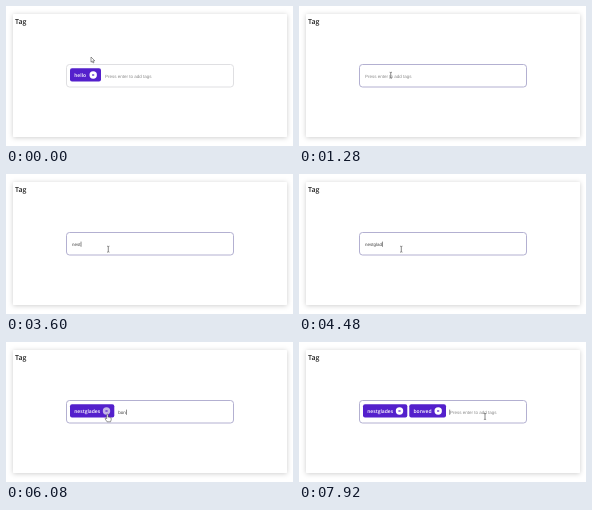
These frames come from a looping animation (287x140 px, 8000 ms). An HTML page:

```html
<!DOCTYPE html>
<html lang="en">
<head>
<meta charset="utf-8">
<title>Tag input</title>
<style>
  html, body { margin: 0; width: 100%; height: 100%; overflow: hidden; background: #fff; }
  svg { display: block; width: 100%; height: 100%; }
  text { text-rendering: geometricPrecision; }
  .title { font: 600 7px "Open Sans", sans-serif; fill: #222; }
  .tag rect { fill: #5420cc; }
  .tag text { font: 600 5px "Open Sans", sans-serif; fill: #fff; }
  .tag circle { fill: #fff; }
  .tag path { stroke: #5420cc; stroke-width: .7; }
  .tag.hover circle { fill: #c3b4e6; }
  #entry { font: 4.5px "Liberation Sans", Arial, sans-serif; }
  #caret { fill: #444; }
  .pointer { fill: #fff; stroke: #444; stroke-width: .55; stroke-linejoin: round; }
  #beam { fill: none; stroke: #555; stroke-width: .7; }
</style>
</head>
<body>
<svg viewBox="0 0 287 140">
  <defs>
    <filter id="shadow" x="-10%" y="-15%" width="120%" height="130%">
      <feDropShadow dx="0" dy=".7" stdDeviation="2.4" flood-color="#000" flood-opacity=".2"/>
    </filter>
  </defs>
  <rect x="7" y="8" width="274" height="123" rx="1" fill="#fff" filter="url(#shadow)"/>
  <text class="title" x="9" y="17.7">Tag</text>
  <rect id="field" x="60.5" y="58.5" width="167" height="22.5" rx="3" fill="#fff" stroke-width=".9"/>
  <g id="tags"></g>
  <text id="entry" y="71.7"></text>
  <rect id="caret" y="67.6" width=".6" height="5.2"/>
  <g id="mouse">
    <path id="arrow" class="pointer" d="M0 0V5.2L1.2 4.1 2 6 2.9 5.6 2.1 3.8H3.8Z"/>
    <path id="hand" class="pointer" d="M-.7 .5Q0-.5.7.5V3Q1.4 2.5 1.8 3.2 2.5 2.8 2.9 3.5 3.8 3.2 3.8 4.2V5.6L3.1 7.6H-.3L-2.3 4.7Q-2.2 3.7-1.3 4.2L-.7 4.8Z"/>
    <path id="beam" d="M-1.1-3Q0-3 0-2.4 0-3 1.1-3M0-2.4V2.4M-1.1 3Q0 3 0 2.4 0 3 1.1 3"/>
  </g>
</svg>
<script>
  const LOOP = 8000, STEP = 80;
  const PLACEHOLDER = "Press enter to add tags";
  const $ = id => document.getElementById(id);
  const show = (node, on) => node.style.display = on ? "" : "none";

  const tags = [
    { label: "hello", x: 64, width: 31, from: 0, to: 1120 },
    { label: "nestglades", x: 64, width: 44.3, from: 4880, to: LOOP },
    { label: "bonved", x: 110.3, width: 36.7, from: 6880, to: LOOP }
  ];

  // Times at which each letter lands, then the Enter key.
  const words = [
    { text: "nestglades", keys: [2720, 2960, 3120, 3440, 4240, 4320, 4400, 4480, 4640, 4720], enter: 4880 },
    { text: "bonved", keys: [5680, 5840, 6080, 6240, 6480, 6640], enter: 6880 }
  ];

  const moves = [
    { from: 80, to: 800, a: [85, 51], b: [86, 66] },
    { from: 1120, to: 1520, a: [86, 66], b: [102.3, 75.2] },
    { from: 4880, to: 5040, a: [102.3, 75.2], b: [101.4, 72.2] },
    { from: 6880, to: 7680, a: [101.4, 72.2], b: [186, 74.5] }
  ];

  for (const tag of tags) {
    tag.icon = tag.x + tag.width - 7.8;
    $("tags").insertAdjacentHTML("beforeend", `<g class="tag">
      <rect x="${tag.x}" y="62.3" width="${tag.width}" height="13.3" rx="2"/>
      <text x="${tag.x + 4.2}" y="70.9">${tag.label}</text>
      <circle cx="${tag.icon}" cy="69" r="3.7"/>
      <path d="M${tag.icon - 1} 68l2 2m0-2l-2 2"/></g>`);
    tag.node = $("tags").lastElementChild;
  }

  function mouseAt(t) {
    const move = moves.findLast(m => t >= m.from) || moves[0];
    const p = Math.min(1, Math.max(0, (t - move.from) / (move.to - move.from)));
    const ease = p * p * (3 - 2 * p);
    return move.a.map((v, i) => v + (move.b[i] - v) * ease);
  }

  function drawTags(t, x, y) {
    let overIcon = false, inputX = 66;
    for (const tag of tags) {
      const on = t >= tag.from && t < tag.to;
      const hover = on && Math.hypot(x - tag.icon, y - 69) < 4.5;
      show(tag.node, on);
      tag.node.classList.toggle("hover", hover);
      overIcon ||= hover;
      if (on) inputX = tag.x + tag.width + 4;
    }
    return { overIcon, inputX };
  }

  function drawEntry(t, x) {
    const word = words.find(w => t >= w.keys[0] && t < w.enter);
    const count = word ? word.keys.filter(k => t >= k).length : 0;
    const entry = $("entry");
    entry.textContent = word ? word.text.slice(0, count) : PLACEHOLDER;
    entry.setAttribute("x", x);
    entry.setAttribute("fill", word ? "#444" : "#8b8b8b");

    const events = [1840, ...words.flatMap(w => [...w.keys, w.enter])];
    const last = events.findLast(k => t >= k);
    const idle = t - last;
    const on = last !== undefined && (t < 2720 ? idle >= 480 : t >= 4880 && t < 5680 || idle % 960 < 480);
    show($("caret"), on);
    $("caret").setAttribute("x", word ? x + entry.getComputedTextLength() + .2 : x - .5);
  }

  function draw(t) {
    const [x, y] = mouseAt(t);
    const { overIcon, inputX } = drawTags(t, x, y);
    drawEntry(t, inputX);
    $("field").setAttribute("stroke", t < 960 ? "#dcdcdf" : t < 1120 ? "#bbbbc0" : "#aba7cc");

    const overInput = t >= 1120 && x > inputX - 3;
    $("mouse").setAttribute("transform", `translate(${x} ${y})`);
    show($("hand"), overIcon);
    show($("beam"), !overIcon && overInput);
    show($("arrow"), !overIcon && !overInput);
  }

  const start = performance.now();
  function tick(now) {
    const t = Math.max(0, now - start) % LOOP;
    draw(Math.floor(t / STEP) * STEP);
    requestAnimationFrame(tick);
  }
  draw(0);
  requestAnimationFrame(tick);
</script>
</body>
</html>
```
